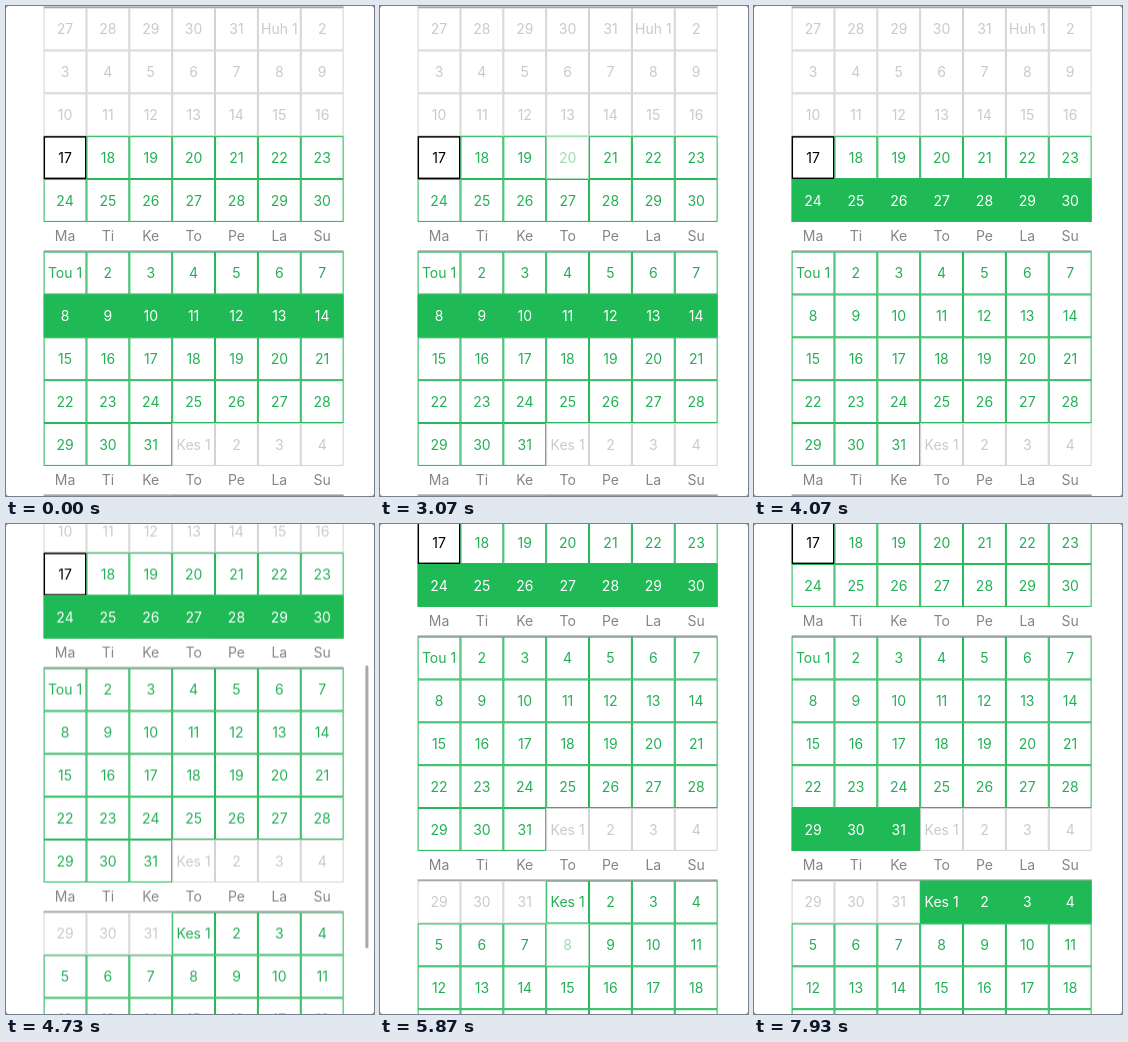
An HTML page for the animation above (8 s loop, 368 by 490 pixels).

```html
<!DOCTYPE html>
<html lang="fi">
<head>
<meta charset="utf-8">
<title>Kalenteri</title>
<style>
  html, body { margin: 0; width: 100%; height: 100%; overflow: hidden; background: #8a8a8a; }
  svg { display: block; width: 368px; height: 490px; background: #fff; border-radius: 3px; }
  text { font: 14px Inter, Roboto, sans-serif; text-anchor: middle; }
  .box { fill: none; stroke-width: 1; }
  .open .box { stroke: #22b557; }
  .open text { fill: #22b055; }
  .off .box { stroke: #d2d2d2; }
  .off text { fill: #cacaca; }
  .today .box { stroke: #000; stroke-width: 1.5; }
  .today text { fill: #000; }
  .day-name { fill: #858585; }
  .rule { fill: #8c8c8c; }
  .week rect { fill: #1fb955; }
  .week text { fill: #fff; }

  #page, #bar, .week, .press { animation: 8s linear infinite; }
  #page { animation-name: scroll; }
  #bar { animation-name: bar-move, bar-fade; animation-duration: 8s; animation-iteration-count: infinite; }
  .week { opacity: 0; animation-timing-function: step-end; }

  @keyframes scroll {
    0%, 52.1% { transform: translateY(0); animation-timing-function: cubic-bezier(.5, 0, .75, .6); }
    56% { transform: translateY(-50px); animation-timing-function: linear; }
    59.1% { transform: translateY(-101px); animation-timing-function: cubic-bezier(.25, .65, .5, 1); }
    65.6%, 100% { transform: translateY(-133px); }
  }
  @keyframes bar-move {
    0%, 52.1% { transform: translateY(0); animation-timing-function: cubic-bezier(.5, 0, .75, .6); }
    56% { transform: translateY(29px); animation-timing-function: linear; }
    59.1% { transform: translateY(58px); animation-timing-function: cubic-bezier(.25, .65, .5, 1); }
    65.6%, 100% { transform: translateY(77px); }
  }
  @keyframes bar-fade {
    0%, 52.1% { opacity: 0; }
    53%, 66% { opacity: 1; }
    69.5%, 100% { opacity: 0; }
  }

  @keyframes week0 { 0% { opacity: 1; } 40.2%, 100% { opacity: 0; } }
  @keyframes week1 { 0% { opacity: 0; } 40.2% { opacity: 1; } 48%, 100% { opacity: 0; } }
  @keyframes week2 { 0% { opacity: 0; } 48% { opacity: 1; } 75.8%, 100% { opacity: 0; } }
  @keyframes week3 { 0% { opacity: 0; } 75.8% { opacity: 1; } 88.8%, 100% { opacity: 0; } }
  @keyframes week4 { 0% { opacity: 0; } 88.8%, 100% { opacity: 1; } }

  @keyframes press1 { 0%, 36.7% { opacity: 1; } 38%, 40.1% { opacity: .45; } 41.5%, 100% { opacity: 1; } }
  @keyframes press2 { 0%, 45.3% { opacity: 1; } 46.6%, 47.9% { opacity: .45; } 49.3%, 100% { opacity: 1; } }
  @keyframes press3 { 0%, 71.8% { opacity: 1; } 73.1%, 75.7% { opacity: .45; } 77.1%, 100% { opacity: 1; } }
  @keyframes press4 { 0%, 85.5% { opacity: 1; } 86.8%, 88.7% { opacity: .45; } 90.1%, 100% { opacity: 1; } }
</style>
</head>
<body>
<svg viewBox="0 0 368 490">
  <g id="page"></g>
  <rect id="bar" x="359.4" y="83" width="3" height="283" rx="1.5" fill="#a9a9a9"/>
</svg>
<script>
  const LEFT = 37.6, TOP = 1.6, CELL = 42.86, MONTH = 244;
  const DAY_NAMES = ['Ma', 'Ti', 'Ke', 'To', 'Pe', 'La', 'Su'];

  // first: date in the top-left cell, prev: length of the month it belongs to,
  // from/to: cell range that can be picked
  const months = [
    { rows: 5, first: 27, prev: 31, days: 30, name: 'Huh', next: 'Tou', from: 21, to: 35 },
    { rows: 5, first: 1, prev: 0, days: 31, name: 'Tou', next: 'Kes', from: 0, to: 31 },
    { rows: 4, first: 29, prev: 31, days: 30, name: 'Kes', next: 'Hei', from: 3, to: 28 },
  ];
  // Each pick is a list of runs: month, row, first column, last column
  const picks = [
    [[1, 1, 0, 6]],
    [[0, 3, 0, 6]],
    [[0, 4, 0, 6]],
    [[2, 1, 0, 6]],
    [[1, 4, 0, 2], [2, 0, 3, 6]],
  ];
  const presses = { '0-24': 'press1', '0-31': 'press2', '2-10': 'press3', '2-3': 'press4' };

  const page = document.getElementById('page');

  function add(parent, tag, attrs, content = '') {
    const node = document.createElementNS('http://www.w3.org/2000/svg', tag);
    for (const key in attrs) node.setAttribute(key, attrs[key]);
    node.textContent = content;
    return parent.appendChild(node);
  }

  const cellX = col => LEFT + col * CELL;
  const cellY = (m, row) => TOP + m * MONTH + row * CELL;

  function label(month, index) {
    const lead = month.prev ? month.prev - month.first + 1 : 0;
    if (index < lead) return String(month.first + index);
    const day = index - lead + 1;
    if (day === 1) return month.name + ' 1';
    if (day <= month.days) return String(day);
    const over = day - month.days;
    return over === 1 ? month.next + ' 1' : String(over);
  }

  function addLabel(parent, m, row, col) {
    add(parent, 'text', { x: cellX(col) + CELL / 2, y: cellY(m, row) + CELL / 2 + 5.1 },
      label(months[m], row * 7 + col));
  }

  function addCell(m, index) {
    const month = months[m], row = Math.floor(index / 7), col = index % 7;
    const isToday = m === 0 && index === 21;
    const open = index >= month.from && index < month.to;
    const cell = add(page, 'g', { class: isToday ? 'today' : open ? 'open' : 'off' });
    const press = presses[m + '-' + index];
    if (press) {
      cell.classList.add('press');
      cell.style.animationName = press;
    }
    const inset = isToday ? .7 : .5;
    add(cell, 'rect', {
      class: 'box', x: cellX(col) + inset, y: cellY(m, row) + inset,
      width: CELL - 2 * inset, height: CELL - 2 * inset,
    });
    addLabel(cell, m, row, col);
  }

  months.forEach((month, m) => {
    for (let i = 0; i < month.rows * 7; i++) addCell(m, i);
    const top = cellY(m, 0);
    add(page, 'rect', { class: 'rule', x: LEFT, y: top - 1.1, width: CELL * 7, height: 1.2 });
    DAY_NAMES.forEach((name, col) =>
      add(page, 'text', { class: 'day-name', x: cellX(col) + CELL / 2, y: top - 10.2 }, name));
  });

  picks.forEach((runs, i) => {
    const week = add(page, 'g', { class: 'week' });
    week.style.animationName = 'week' + i;
    for (const [m, row, start, end] of runs) {
      add(week, 'rect', {
        x: cellX(start), y: cellY(m, row), width: (end - start + 1) * CELL, height: CELL,
      });
      for (let col = start; col <= end; col++) addLabel(week, m, row, col);
    }
  });
</script>
</body>
</html>
```
